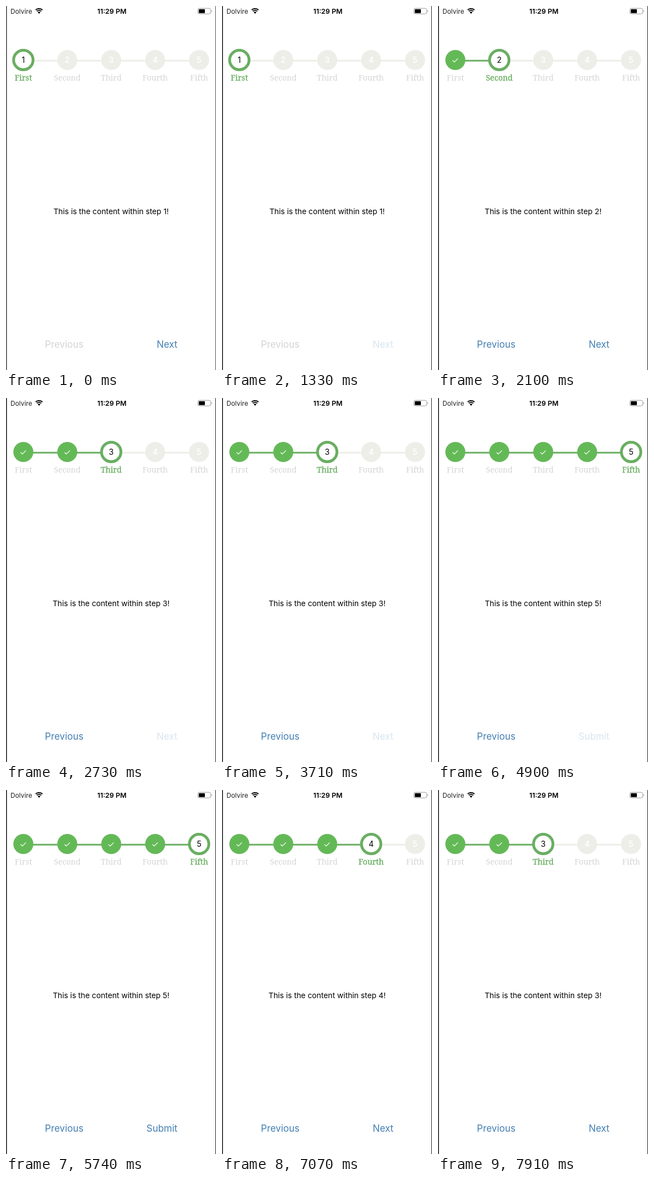
Write an HTML page that moves like this. It is 378 px wide and 654 px high and loops after 8 s.

```html
<!DOCTYPE html>
<html lang="en">
<head>
<meta charset="utf-8">
<title>Step wizard</title>
<style>
  html, body { margin: 0; width: 100%; height: 100%; overflow: hidden; background: #fff; }
  svg { display: block; width: 378px; height: 654px; font-family: Inter, sans-serif; }
  .mid { text-anchor: middle; }
  .end { text-anchor: end; }
  .num { font-size: 14px; }
  .label { font-family: "Noto Serif", serif; font-size: 14.2px; }
  .button { font-size: 17px; }
  .status { font-size: 11.8px; }
  .time { font-size: 12.4px; font-weight: 600; }
</style>
</head>
<body>
<svg id="stage" viewBox="0 0 378 654"></svg>
<script>
const LOOP = 8000, TICK = 70;
const PRESS_MS = 60, RELEASE_MS = 250, DIM = 0.2;
const FILL = '#64b957', GREEN = '#6aae62', GRAY = '#eeeee9', LABEL = '#d4d4d4', BLUE = '#437fb3';
const NAMES = ['First', 'Second', 'Third', 'Fourth', 'Fifth'];
const CENTER_Y = 97;
const centerX = i => 31.2 + 79.1 * i;

// Each tap: finger down, finger up, button, step shown afterwards
const TAPS = [
  { down: 1265, up: 1430, button: 'next', step: 1 },
  { down: 2420, up: 2730, button: 'next', step: 2 },
  { down: 3645, up: 3880, button: 'next', step: 3 },
  { down: 4660, up: 4900, button: 'next', step: 4 },
  { down: 6270, up: 6510, button: 'previous', step: 3 },
  { down: 7390, up: 7630, button: 'previous', step: 2 }
];

const stage = document.getElementById('stage');

function add(tag, attrs, text) {
  const el = document.createElementNS('http://www.w3.org/2000/svg', tag);
  set(el, attrs);
  if (text) el.textContent = text;
  return stage.appendChild(el);
}

function set(el, attrs) {
  for (const key in attrs) el.setAttribute(key, attrs[key]);
}

function drawStatusBar() {
  add('text', { x: 8, y: 13.5, class: 'status', fill: '#222' }, 'Dolvire');
  for (const r of [9, 5.7])
    add('path', {
      d: `M${59.5 - r * 0.68} ${13.6 - r * 0.73}A${r} ${r} 0 0 1 ${59.5 + r * 0.68} ${13.6 - r * 0.73}`,
      fill: 'none', stroke: '#000', 'stroke-width': 2
    });
  add('path', { d: 'M59.5 14L57.1 11.3A3.5 3.5 0 0 1 61.9 11.3Z' });
  add('text', { x: 190.5, y: 13.5, class: 'time mid' }, '11:29 PM');
  add('rect', { x: 345.5, y: 4.2, width: 23, height: 10, rx: 2.2, fill: '#fff', stroke: '#999' });
  add('rect', { x: 347, y: 5.7, width: 11, height: 7, rx: 0.8 });
  add('path', { d: 'M370 7.5Q372 9.2 370 11Z', fill: '#888' });
}

drawStatusBar();

const bars = NAMES.slice(1).map((_, i) => add('path', {
  d: `M${centerX(i) + 17} 98.3H${centerX(i + 1) - 17}`, 'stroke-width': 3
}));

const steps = NAMES.map((name, i) => {
  const x = centerX(i);
  return {
    disc: add('circle', { cx: x, cy: CENTER_Y, 'stroke-width': 5 }),
    num: add('text', { x, y: 102.4, class: 'num mid' }, String(i + 1)),
    check: add('path', {
      d: `M${x - 5} 97.7l3.3 2.9 6.4-6.2`, fill: 'none', stroke: '#fff', 'stroke-width': 1.2
    }),
    label: add('text', { x, y: 134, class: 'label mid', 'stroke-width': 0.35 }, name)
  };
});

const content = add('text', { x: 189.2, y: 373.7, class: 'mid', 'font-size': 13.75 }, ' ');
const buttons = {
  previous: add('text', { x: 104.8, y: 614, class: 'button mid' }, 'Previous'),
  next: add('text', { x: 308.7, y: 614, class: 'button end', fill: BLUE }, 'Next')
};
const leftEdge = add('rect', { width: 1.6, height: 654 });
const rightEdge = add('rect', { x: 377, width: 1, height: 654 });

function showStep(current) {
  steps.forEach(({ disc, num, check, label }, i) => {
    const active = i === current, done = i < current;
    set(disc, {
      r: active ? 17.5 : 18,
      fill: active ? '#fff' : done ? FILL : GRAY,
      stroke: active ? GREEN : 'none'
    });
    set(num, { fill: active ? '#000' : '#fff', 'font-weight': active ? 400 : 500, opacity: done ? 0 : 1 });
    set(check, { opacity: done ? 1 : 0 });
    set(label, { fill: active ? GREEN : LABEL, stroke: active ? GREEN : 'none' });
  });
  bars.forEach((bar, i) => set(bar, { stroke: i < current ? GREEN : GRAY }));
  content.textContent = `This is the content within step ${current + 1}!`;
  buttons.next.textContent = current === NAMES.length - 1 ? 'Submit' : 'Next';
  set(buttons.previous, { fill: current ? BLUE : '#d3d3d3' });
}

function ease(p) {
  p = Math.min(1, Math.max(0, p));
  return p < 0.5 ? 2 * p * p : 1 - 2 * (1 - p) ** 2;
}

function opacityAt(t, button) {
  return TAPS.filter(tap => tap.button === button).reduce((value, { down, up }) =>
    value - (1 - DIM) * (ease((t - down) / PRESS_MS) - ease((t - up) / RELEASE_MS)), 1);
}

let shown = -1;

function render(time) {
  const t = Math.floor(time % LOOP / TICK) * TICK;
  const current = TAPS.reduce((step, tap) => t >= tap.up ? tap.step : step, 0);
  if (current !== shown) showStep(shown = current);
  for (const name in buttons) set(buttons[name], { opacity: opacityAt(t, name) });
  const edge = t < 1330 ? '#505052' : '#232325';
  set(leftEdge, { fill: edge });
  set(rightEdge, { fill: edge });
}

const start = performance.now();
function frame() {
  render(performance.now() - start);
  requestAnimationFrame(frame);
}
frame();
</script>
</body>
</html>
```
